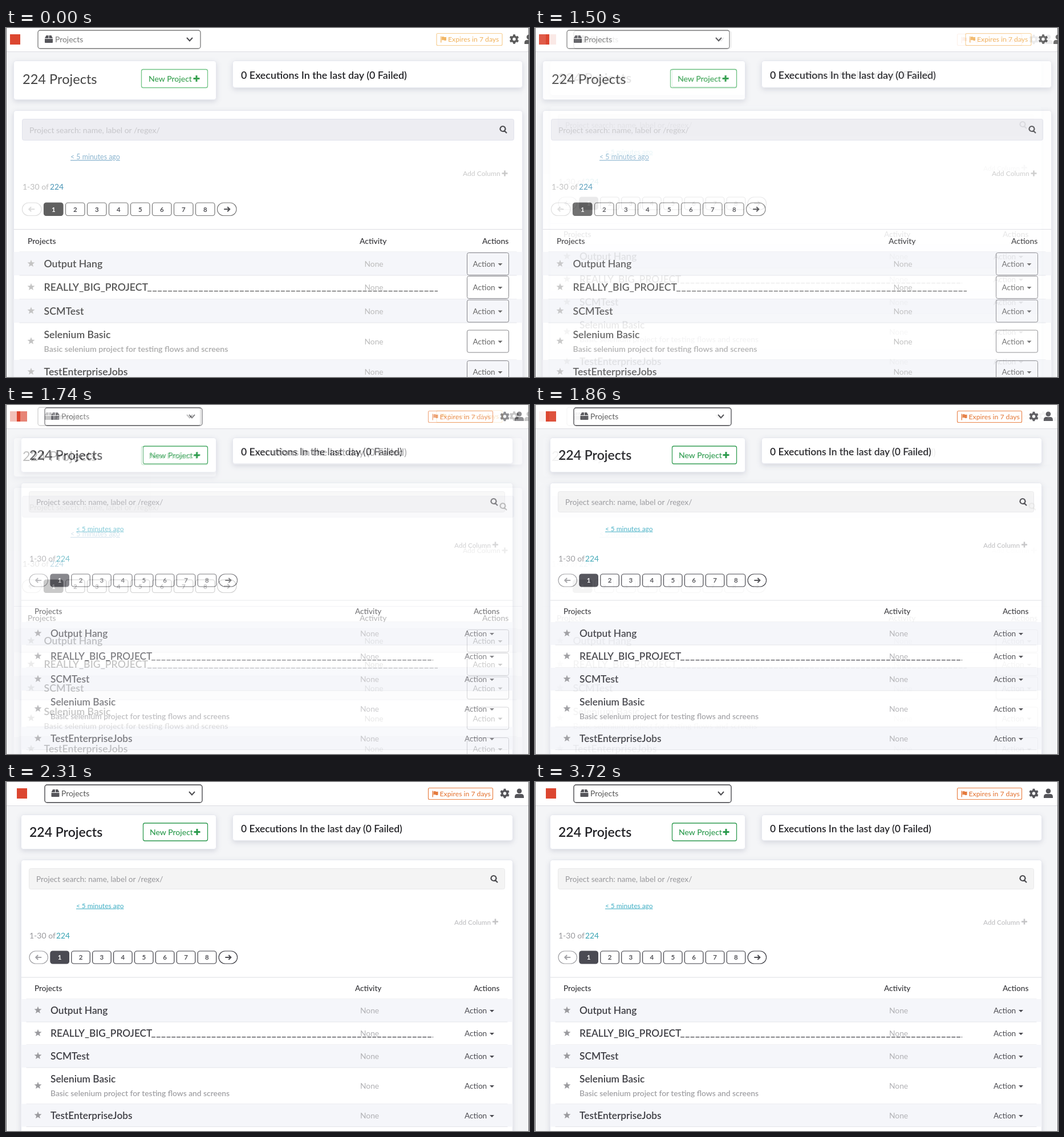
An HTML page that plays this animation: 917 px wide and 611 px high, repeating every 3.75 s.

```html
<!DOCTYPE html>
<html lang="en">
<head>
<meta charset="utf-8">
<title>Projects</title>
<style>
  html, body { margin: 0; width: 100%; height: 100%; overflow: hidden; background: #f4f5f7; }
  svg { display: block; }
  #stage { width: 917px; height: 611px; font-family: Lato, "Open Sans", sans-serif; }
  .card { fill: #fff; filter: drop-shadow(0 3px 5px rgba(40, 50, 90, .15)); }
</style>
</head>
<body>
<svg id="stage" viewBox="0 0 917 611">
  <g id="before"></g>
  <g id="after"></g>
</svg>
<script>
const LOOP = 3750, FADE_START = 1450, FADE_END = 1890;

const before = {
  logo: 7, select: [56, 4, 285, 32], selectStroke: '#777', boxX: 68, nameX: 86, chevron: 322, nameInk: '#777',
  badge: [755, 9.5, 115, 21], badgeStroke: '#f7cf93', badgeInk: '#f2b765', gear: [891, 19.5], user: 917, iconInk: '#5c5c5c',
  count: [13.5, 57.5, 355, 68], countText: [29, 98, 23.6, 400, '#444'],
  add: [237.5, 72.5, 116, 32], addText: [250, 94], addStroke: '#72c486', addInk: '#36a04f', plus: [334, 88.5],
  runs: [397.5, 57.5, 508, 47], runsText: [412, 89, 17.9], panel: [13.5, 144.5, 892],
  search: [28.5, 159.5, 862, 37], searchFill: '#ededf2', searchStroke: '#e1e2ec', searchText: [41, 184, 14, '#c6c6ca'], lens: [871, 177],
  ago: [113, 230, 12.4, 400, '#8ab4cf'], column: [801, 258.5, 12.1, 400, '#c9c9c9'], columnPlus: [874.5, 254.5],
  range: [29, 282.5, 14, '#bdbdbd'], total: [77, '#4794b5'],
  page: { x: 28.5, y: 306, w: 33.5, h: 22.5, step: 38, ink: '#777', off: '#ddd', on: '#606060' },
  rule: 352.5, head: { y: 377.5, x: [38, 620, 835], size: 13.9 },
  rows: [392, 433, 474.5, 516, 581, 622], mids: [413, 454, 495.5, 548.5, 602],
  inset: 10, star: 44, starInk: '#c4c4c4', title: 66.5, titleSize: 17.7, titleInk: '#555', sub: [14.2, '#aaa'],
  lineEnd: 757, lineStart: 247.5, none: 628.5, noneInk: '#bbb', action: 818.5, actionInk: '#666', boxed: 808.5
};

const after = {
  logo: 19, select: [68, 5, 276, 31], selectStroke: '#3d3d42', boxX: 79.5, nameX: 97, chevron: 326, nameInk: '#555',
  badge: [740.5, 10.5, 113, 20], badgeStroke: '#e98146', badgeInk: '#e57a3c', gear: [874.5, 20], user: 900, iconInk: '#55555a',
  count: [26.5, 57.5, 342, 60], countText: [41, 96, 23, 600, '#222226'],
  add: [240.5, 72, 113, 31], addText: [252, 92.5], addStroke: '#2f9a50', addInk: '#2a9a4c', plus: [335, 87.5],
  runs: [397.5, 57.5, 491, 45], runsText: [412, 88, 17.4], panel: [26.5, 136.5, 862],
  search: [40.5, 151.5, 834, 36], searchFill: '#f4f4f4', searchStroke: '#e9e9ea', searchText: [53, 175, 13.6, '#96969a'], lens: [855, 169],
  ago: [123, 220.5, 11.9, 600, '#5cbacd'], column: [786, 249.5, 11.7, 600, '#c4c4c6'], columnPlus: [858, 244.5],
  range: [41, 273.5, 14, '#98989c'], total: [88, '#35a3b3'],
  page: { x: 41, y: 296, w: 32.5, h: 22, step: 36.9, ink: '#3f3f46', off: '#a2a2a6', on: '#4b4b53' },
  rule: 342, head: { y: 366, x: [50, 612, 820], size: 13.6 },
  rows: [380, 420, 460, 500, 563.5, 603.5], mids: [400, 440, 480, 532, 584],
  inset: 9, star: 56, starInk: '#9b9b9f', title: 78, titleSize: 17.3, titleInk: '#3e3e44', sub: [13.8, '#a0a0a4'],
  lineEnd: 749, lineStart: 254.5, none: 621, noneInk: '#b0b0b4', action: 804, actionInk: '#4a4a50'
};

const names = ['Output Hang', 'REALLY_BIG_PROJECT', 'SCMTest', 'Selenium Basic', 'TestEnterpriseJobs'];

const text = (x, y, s, size, fill, weight = 400, extra = '') =>
  `<text x="${x}" y="${y}" font-size="${size}" fill="${fill}" font-weight="${weight}" ${extra}>${s}</text>`;
const rect = ([x, y, w, h], r, fill, stroke = 'none', extra = '') =>
  `<rect x="${x}" y="${y}" width="${w}" height="${h}" rx="${r}" fill="${fill}" stroke="${stroke}" ${extra}/>`;
const path = (x, y, d, fill, stroke = 'none', width = 1) =>
  `<path transform="translate(${x} ${y})" d="${d}" fill="${fill}" stroke="${stroke}" stroke-width="${width}"/>`;
const hline = (x1, x2, y, color) => path(x1, y, `M0 0H${x2 - x1}`, 'none', color);
const card = (box) => rect(box, 4, '#fff', '#e6e8ef', 'class="card"');
const plus = ([x, y], r, color, w) => path(x, y, `M${-r} 0H${r}M0 ${-r}V${r}`, 'none', color, w);
const arrow = (x, y, dir, color) =>
  path(x, y, `M${-5 * dir} 0H${4 * dir}M${dir} -4L${5 * dir} 0L${dir} 4`, 'none', color, 2);

const starPath = 'M' + Array.from({ length: 10 }, (_, i) => {
  const r = i % 2 ? 2.9 : 6.8, a = i * Math.PI / 5;
  return `${(r * Math.sin(a)).toFixed(2)} ${(-r * Math.cos(a)).toFixed(2)}`;
}).join('L') + 'Z';

function gear([x, y], color) {
  const teeth = Array.from({ length: 6 }, (_, i) =>
    `<rect x="-2" y="-8.3" width="4" height="5" rx=".8" transform="rotate(${i * 60})"/>`).join('');
  return `<g transform="translate(${x} ${y})" fill="${color}">${teeth}` +
    `<circle r="4.5" fill="none" stroke="${color}" stroke-width="3.6"/></g>`;
}

function topBar(c) {
  const [bx, by] = c.badge;
  return rect([0, 0, 917, 41], 0, '#fff') + hline(0, 917, 41.5, '#dcdde1') +
    rect([c.logo, 11, 18, 18], 0, '#dc4630') +
    rect(c.select, 4, '#fff', c.selectStroke, 'stroke-width="1.3"') +
    path(c.boxX, 13, 'M2.5 0H6.5V5H0ZM7.5 0H11.5L14 5H7.5ZM0 6H14V12Q14 13 13 13H1Q0 13 0 12Z', '#55555a') +
    text(c.nameX, 25, 'Projects', 13.9, c.nameInk) +
    path(c.chevron, 20, 'M-5 -3L0 2.5L5 -3', 'none', '#4c4c50', 2) +
    rect(c.badge, 2, '#fff', c.badgeStroke, 'stroke-width="1.2"') +
    path(bx + 7, by + 5, 'M0 0H1.4V11H0ZM2 1Q4 0 6 1T10 1V7Q8 8 6 7T2 7Z', c.badgeInk) +
    text(bx + 20, by + 14.5, 'Expires in 7 days', 12.2, c.badgeInk, 500) +
    gear(c.gear, c.iconInk) +
    path(c.user, 20, 'M0 -8.5A4.3 4.3 0 1 1 -.01 -8.5ZM-8 8V6Q-8 1 -3.5 1H3.5Q8 1 8 6V8Z', c.iconInk);
}

function summary(c) {
  const [x, y, size, weight, ink] = c.countText;
  return card(c.count) + text(x, y, '224 Projects', size, ink, weight) +
    rect(c.add, 3, '#fff', c.addStroke, 'stroke-width="1.3"') +
    text(...c.addText, 'New Project', 14, c.addInk, 500) + plus(c.plus, 5.5, c.addInk, 3) +
    card(c.runs) +
    text(c.runsText[0], c.runsText[1], '0 Executions In the last day (0 Failed)', c.runsText[2], '#252529', 600);
}

function pager(c) {
  const p = c.page, mid = p.y + p.h / 2;
  let out = '';
  for (let i = 0; i < 10; i++) {
    const x = p.x + i * p.step, end = i % 9 === 0, on = i === 1;
    const ink = i ? p.ink : p.off;
    out += rect([x, p.y, p.w, p.h], end ? p.h / 2 : 4, on ? p.on : '#fff', on ? p.on : ink, 'stroke-width="1.2"');
    out += end ? arrow(x + p.w / 2, mid, i ? 1 : -1, i ? '#4c4c50' : p.off)
      : text(x + p.w / 2, mid + 4.3, i, 11.5, on ? '#fff' : '#505055', 700, 'text-anchor="middle"');
  }
  return out;
}

function row(c, i, left, right) {
  const mid = c.mids[i], top = c.rows[i], next = c.rows[i + 1], sub = i === 3;
  const base = mid + (sub ? -5.7 : 6);
  let out = '';
  if (i % 2 === 0) out += rect([left, top, right - left, next - top], 0, '#f5f6fa');
  out += hline(left + c.inset, right - c.inset, next, '#e3e4e9');
  out += path(c.star, mid - .5, starPath, c.starInk);
  out += text(c.title, base, names[i], c.titleSize, c.titleInk, 600);
  if (sub) out += text(c.title, mid + 18, 'Basic selenium project for testing flows and screens', c.sub[0], c.sub[1], 600);
  out += text(c.none, mid + 5, 'None', 13.8, c.noneInk);
  if (i === 1) {
    out += `<svg x="${c.lineStart}" y="${mid - 14}" width="${c.lineEnd - c.lineStart}" height="30">` +
      text(0, 18.5, '_'.repeat(100), c.titleSize, c.titleInk, 600, 'letter-spacing=".8"') + '</svg>';
  }
  if (c.boxed) out += rect([c.boxed, mid - 19.5, 73, 39], 3, 'none', '#858589');
  out += text(c.action, mid + 5, 'Action', 13.6, c.actionInk);
  return out + path(c.action + 48, mid - 1, 'M-4 0H4L0 4Z', c.actionInk);
}

function panel(c) {
  const [left, top, width] = c.panel, right = left + width;
  const [sx, sy, ss, si] = c.searchText, [ax, ay, as, aw, ai] = c.ago;
  const [cx, cy, cs, cw, ci] = c.column, [rx, ry, rs, ri] = c.range;
  return card([left, top, width, 520]) +
    rect(c.search, 3, c.searchFill, c.searchStroke) +
    text(sx, sy, 'Project search: name, label or /regex/', ss, si) +
    path(...c.lens, 'M0 -5A4.5 4.5 0 1 1 -.01 -5ZM3 3L7 7', 'none', '#4c4c50', 2.2) +
    text(ax, ay, '&lt; 5 minutes ago', as, ai, aw, 'text-decoration="underline"') +
    text(cx, cy, 'Add Column', cs, ci, cw) + plus(c.columnPlus, 5, ci, 2.6) +
    text(rx, ry, '1-30 of', rs, ri) + text(c.total[0], ry, '224', 13.8, c.total[1]) +
    pager(c) + hline(left, right, c.rule, '#dcdde2') +
    ['Projects', 'Activity', 'Actions'].map((s, i) =>
      text(c.head.x[i], c.head.y, s, c.head.size, '#333337', 500)).join('') +
    hline(left + c.inset, right - c.inset, c.rows[0], '#e3e4e9') +
    names.map((_, i) => row(c, i, left, right)).join('');
}

function draw(id, c) {
  const g = document.getElementById(id);
  g.innerHTML = rect([0, 0, 917, 611], 0, '#f4f5f7') + topBar(c) + summary(c) + panel(c) +
    path(.5, 0, 'M0 0V611M916 0V611', 'none', '#66666a');
  return g;
}

draw('before', before);
draw('after', after).animate([
  { opacity: 0, offset: 0 },
  { opacity: 0, offset: FADE_START / LOOP },
  { opacity: 1, offset: FADE_END / LOOP },
  { opacity: 1, offset: 1 }
], { duration: LOOP, iterations: Infinity });
</script>
</body>
</html>
```
